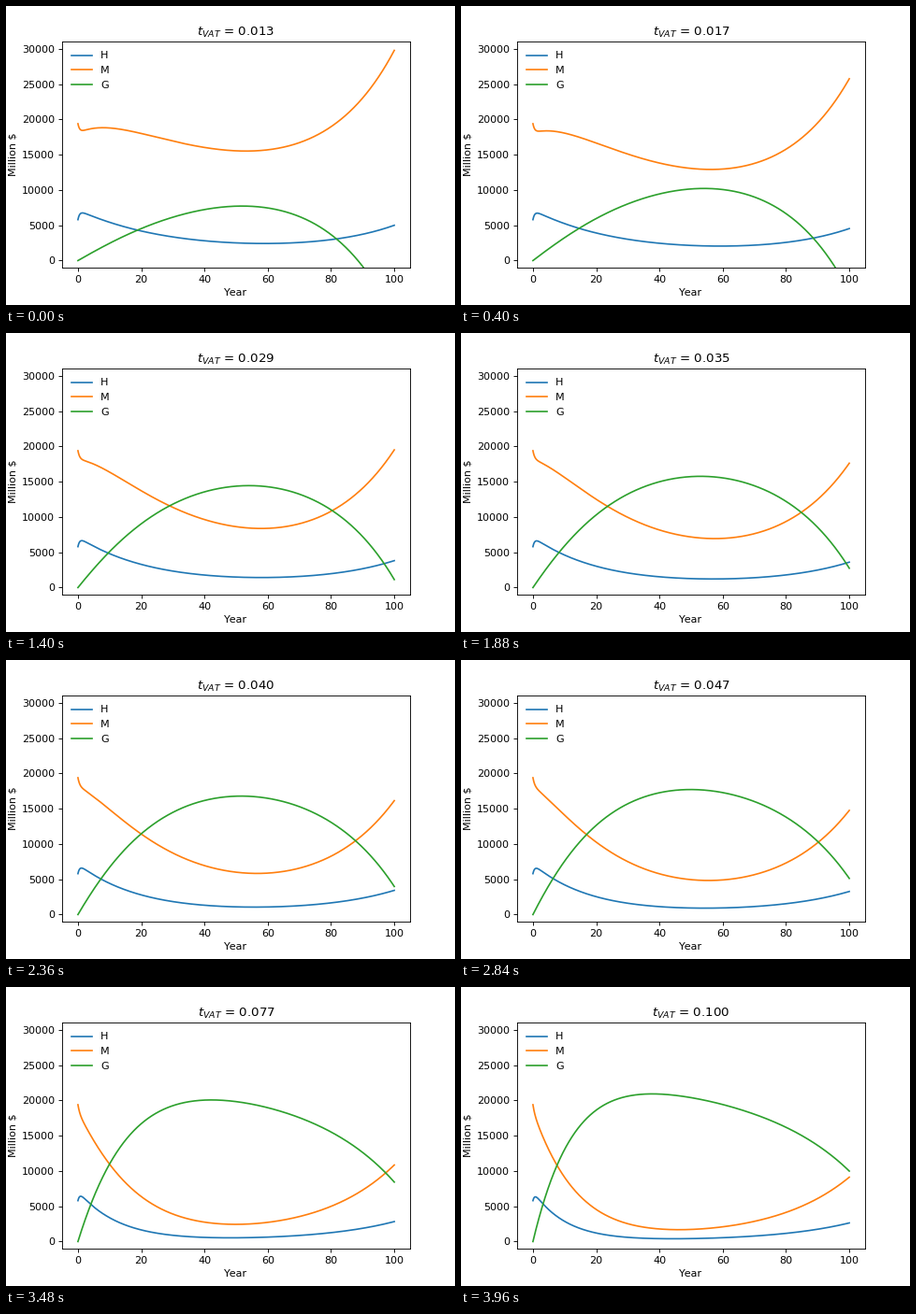
A matplotlib script for the animation above (4000 ms loop, 480 by 320 pixels).

```python
import numpy as np
import matplotlib.pyplot as plt
from matplotlib.animation import FuncAnimation

plt.rcParams["font.family"] = "DejaVu Sans"
plt.rcParams["text.kerning_factor"] = 6

# VAT rate per frame: a slow sweep, then a faster one
RATES = np.concatenate([np.linspace(0.0125, 0.045, 70),
                        np.linspace(0.045, 0.1, 30)])

STEP = 0.05
YEARS = np.arange(0, 100 + STEP / 2, STEP)
H_START, M_START = 5800, 19400
SETTLE = 1.8                # speed of the first adjustment

spending = 18.1 * np.exp(0.042 * YEARS)
inflow = 420 * np.exp(-0.1 * YEARS)


def settle(path, start):
    """Begin at the given level and join the slow path quickly."""
    return path + (start - path[0]) * np.exp(-SETTLE * YEARS)[:, None]


def simulate(vat):
    """H, M and G over the years, one column per VAT rate."""
    savings = 5100 * np.exp(-np.outer(YEARS, 0.035 + 0.68 * vat))
    h, m, g = np.zeros((3, len(YEARS), len(vat)))
    m[0] = 18000 + 5000 * vat
    for i, s in enumerate(spending):
        h[i] = 0.111 * m[i] + 1.35 * s + savings[i]
        if i + 1 == len(YEARS):
            break
        tax = 0.93 * vat * m[i]
        transfer = 0.0013 * g[i]
        dm = s + inflow[i] + transfer - tax
        dg = (tax + 0.17 * vat * h[i] + 0.01 * savings[i]
              - 1.08 * s - transfer - 1.4e-7 * g[i] ** 2)
        m[i + 1] = m[i] + STEP * dm
        g[i + 1] = g[i] + STEP * dg
    return settle(h, H_START), settle(m, M_START), g


stocks = simulate(RATES)

fig, ax = plt.subplots(figsize=(6, 4), dpi=80)
fig.subplots_adjust(left=0.125, right=0.9, bottom=0.125, top=0.88)
lines = [ax.plot([], [], label=name)[0] for name in "HMG"]
ax.set_xlim(-5, 105)
ax.set_ylim(-1000, 31000)
ax.set_xlabel("Year")
ax.set_ylabel("Million $")
ax.legend(loc="upper left", frameon=False)
title = ax.set_title("")


def draw(i):
    for line, stock in zip(lines, stocks):
        line.set_data(YEARS, stock[:, i])
    title.set_text(f"$t_{{VAT}}$ = {RATES[i]:.3f}")
    return [*lines, title]


anim = FuncAnimation(fig, draw, frames=len(RATES), interval=40,
                     repeat=True, repeat_delay=0)
plt.show()
```
